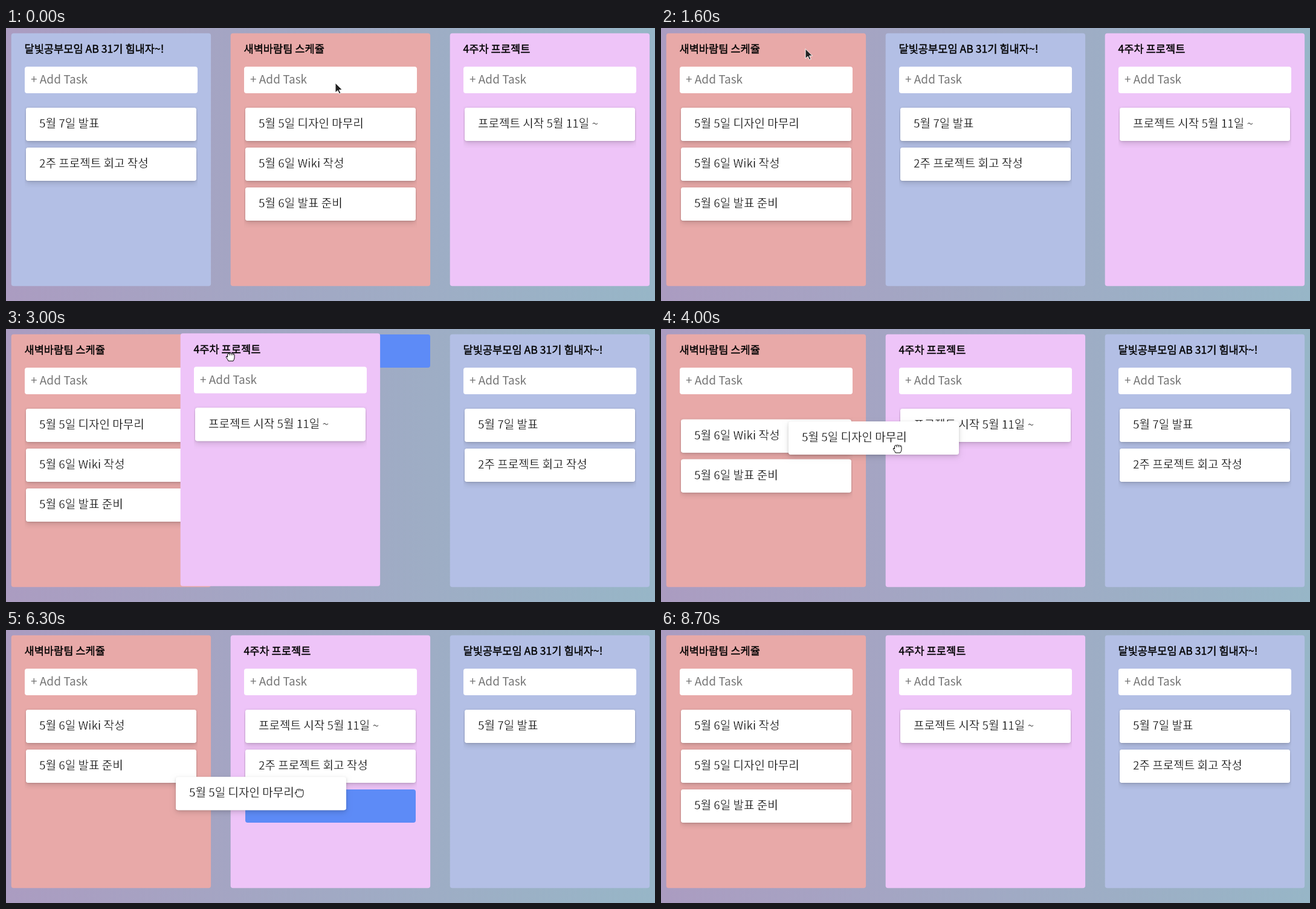
Recreate the animation shown at these times as an HTML page with a canvas. Size 1074 px wide and 452 px high, loop 9900 ms.

```html
<!DOCTYPE html>
<html lang="ko">
<head>
<meta charset="utf-8">
<style>
  html, body { margin: 0; overflow: hidden; }
  canvas { display: block; }
</style>
</head>
<body>
<canvas width="1074" height="452"></canvas>
<script>
const ctx = document.querySelector('canvas').getContext('2d');
const FONT = '"Noto Sans CJK KR", "Noto Sans KR", sans-serif';
const LOOP = 9900, STEP = 100, EASE_MS = 310, POINTER_HIDES = 8700;
const TOP = 9, CARD_TOP = 132, CARD_PITCH = 66;
const columnX = i => 9 + 363 * i;
const cardAt = (col, slot) => [columnX(col) + 24, CARD_TOP + CARD_PITCH * slot];

// Neighbours make room, dragged items follow the pointer and then settle at `to`
const shift = (start, to) => ({ start, end: start, to });
const drag = (start, end, grab, drop, to) =>
  ({ start, end, grab, drop, to, leave: start + 290, arrive: end - 200 });

// rest is the index a column ends up at; its cards are laid out for that place
const column = (title, color, first, rest, ...moves) =>
  ({ title, color, rest, home: [columnX(first), TOP], w: 330, moves });
const blue = column('달빛공부모임 AB 31기 힘내자~!', '#b3bfe5', 0, 2,
  shift(902, [columnX(1), TOP]), shift(2700, [columnX(2), TOP]));
const red = column('새벽바람팀 스케쥴', '#e8a9a8', 1, 0,
  drag(600, 1300, [531.5, 43], [228, 36], [columnX(0), TOP]));
const pink = column('4주차 프로젝트', '#eec4f8', 2, 1,
  drag(2400, 3000, [817, 47.5], [371, 46], [columnX(1), TOP]));
const columns = [blue, red, pink];

const card = (owner, text, slot, ...moves) =>
  ({ owner, text, home: cardAt(owner.rest, slot), w: 282, moves });
const cards = [
  card(blue, '5월 7일 발표', 0),
  card(blue, '2주 프로젝트 회고 작성', 1,
    drag(5100, 5700, [893, 213], [540, 226], cardAt(1, 1)),
    drag(7500, 8200, [500, 230], [879, 222], cardAt(2, 1))),
  card(red, '5월 5일 디자인 마무리', 0,
    drag(3600, 4300, [213, 177], [590, 236], cardAt(1, 1)),
    shift(5500, cardAt(1, 2)),
    drag(6100, 6700, [600, 290], [255, 228], cardAt(0, 1))),
  card(red, '5월 6일 Wiki 작성', 1, shift(3890, cardAt(0, 0))),
  card(red, '5월 6일 발표 준비', 2, shift(3890, cardAt(0, 1)), shift(6500, cardAt(0, 2))),
  card(pink, '프로젝트 시작 5월 11일 ~', 0)
];
const drags = [...columns, ...cards].flatMap(item => item.moves).filter(m => m.grab);

// The pointer runs through every grab and drop, and these points on the way
const waypoints = [
  [0, 545, 91], [300, 563, 45], [1100, 295, 30], [1900, 250, 33], [2100, 846, 60],
  [2600, 658.5, 43], [4000, 391, 198], [4400, 944, 262], [4500, 888, 270],
  [5400, 734, 238], [7000, 291, 259], [8400, 879, 222], [8600, 512, 97]
];
const route = drags.flatMap(m => [[m.start, ...m.grab], [m.end, ...m.drop]])
  .concat(waypoints).sort((a, b) => a[0] - b[0]);

const mix = (a, b, u) => a.map((v, i) => v + (b[i] - v) * u);
const easeOut = u => 1 - (1 - Math.min(1, Math.max(0, u))) ** 3;
const isHeld = (item, t) => item.moves.some(m => m.grab && t >= m.start && t < m.end + EASE_MS);

function pointerAt(t) {
  const next = route.findIndex(key => key[0] > t);
  if (next < 0) return route.at(-1).slice(1);
  const [t0, ...from] = route[next - 1], [t1, ...to] = route[next];
  return mix(from, to, (t - t0) / (t1 - t0));
}

function place(item, t) {
  let at = item.home;
  for (const m of item.moves) {
    if (t < m.start) break;
    if (m.grab) {
      const pointer = pointerAt(Math.min(t, m.end));
      at = at.map((v, i) => v + pointer[i] - m.grab[i]);
    }
    at = mix(at, m.to, easeOut((t - m.end) / EASE_MS));
  }
  return at;
}

function box(x, y, w, h, color) {
  ctx.fillStyle = color;
  ctx.beginPath();
  ctx.roundRect(x, y, w, h, 4);
  ctx.fill();
}

// A hairline in the text colour thickens the letters, one in the paper colour thins them
function label(text, x, y, size, color, hairline) {
  ctx.font = `${size}px ${FONT}`;
  ctx.fillStyle = color;
  ctx.fillText(text, x, y);
  if (!hairline) return;
  ctx.lineWidth = .4;
  ctx.strokeStyle = hairline;
  ctx.strokeText(text, x, y);
}

function drawColumn(col, t) {
  const [x, y] = place(col, t);
  box(x - .3, y - .3, col.w + .4, 418.6, col.color);
  label(col.title, x + 21.5, y + 32, 17.6, '#000', '#000');
  box(x + 22, y + 55, 286, 44, '#fff');
  label('+ Add Task', x + 32, y + 83, 19, '#757575');
}

function drawCard(item, t) {
  const [colX, colY] = place(item.owner, t);
  let [x, y] = place(item, t);
  x += colX - columnX(item.owner.rest);
  y += colY - TOP;
  ctx.save();
  if (!isHeld(item, t)) {
    ctx.beginPath();
    ctx.rect(x - 2, y - 3, item.w + 4, 70);
    ctx.clip();
  }
  for (const [drop, blur, alpha] of [[4, 10, .14], [1, 3, .13]]) {
    ctx.shadowColor = `rgba(0,0,0,${alpha})`;
    ctx.shadowBlur = blur;
    ctx.shadowOffsetY = drop;
    box(x, y, item.w, 55, '#fff');
  }
  ctx.restore();
  label(item.text, x + 22, y + 33, 19, '#000', '#fff');
}

function drawPreviews(t) {
  for (const item of [...columns, ...cards]) {
    for (const m of item.moves.filter(m => m.grab)) {
      if (t >= m.start && t < m.leave) box(...place(item, m.start - 1), item.w, 55, '#5d8bf7');
      if (t >= m.arrive && t < m.end + EASE_MS) box(...m.to, item.w, 55, '#5d8bf7');
    }
  }
}

const arrow = new Path2D('M0 0V16L4 12.5 6.5 18 9 17 6.5 11.5H11.5Z');
const hand = new Path2D('M-4.5 1V-4Q-3-7-1.5-5Q0-7.5 1.5-5Q3-7 4.3-4.5Q6.5-6 7-3V2' +
  'Q6.5 5 5 7H-3Q-4 4-6.5 1.5Q-7.5-1.5-4.5-.5M-1.5-5V-2.5M1.5-5V-2.5M4.3-4.5V-2.5');

function drawPointer(t) {
  if (t >= POINTER_HIDES) return;
  const grabbing = drags.some(m => t >= m.start - 300 && t <= m.end);
  const shape = grabbing ? hand : arrow;
  ctx.save();
  ctx.translate(...pointerAt(t));
  ctx.lineWidth = 1;
  ctx.fillStyle = grabbing ? '#fff' : '#222';
  ctx.strokeStyle = grabbing ? '#000' : '#fff';
  ctx.fill(shape);
  ctx.stroke(shape);
  ctx.restore();
}

const backdrop = ctx.createLinearGradient(0, 0, 1074, 0);
backdrop.addColorStop(0, '#ab9cc1');
backdrop.addColorStop(1, '#97b6c7');

function draw(t) {
  ctx.fillStyle = backdrop;
  ctx.fillRect(0, 0, 1074, 452);
  const heldColumn = columns.find(c => isHeld(c, t));
  const heldCard = cards.find(c => isHeld(c, t));
  const drawCards = test => cards.filter(test).forEach(c => drawCard(c, t));

  if (heldColumn) drawPreviews(t);
  columns.filter(c => c !== heldColumn).forEach(c => drawColumn(c, t));
  if (heldCard) drawPreviews(t);
  drawCards(c => c !== heldCard && c.owner !== heldColumn);
  if (heldColumn) {
    drawColumn(heldColumn, t);
    drawCards(c => c.owner === heldColumn);
  }
  if (heldCard) drawCard(heldCard, t);
  drawPointer(t);
}

function frame() {
  const t = performance.now() % LOOP;
  draw(Math.floor(t / STEP) * STEP);
  requestAnimationFrame(frame);
}
frame();
</script>
</body>
</html>
```
